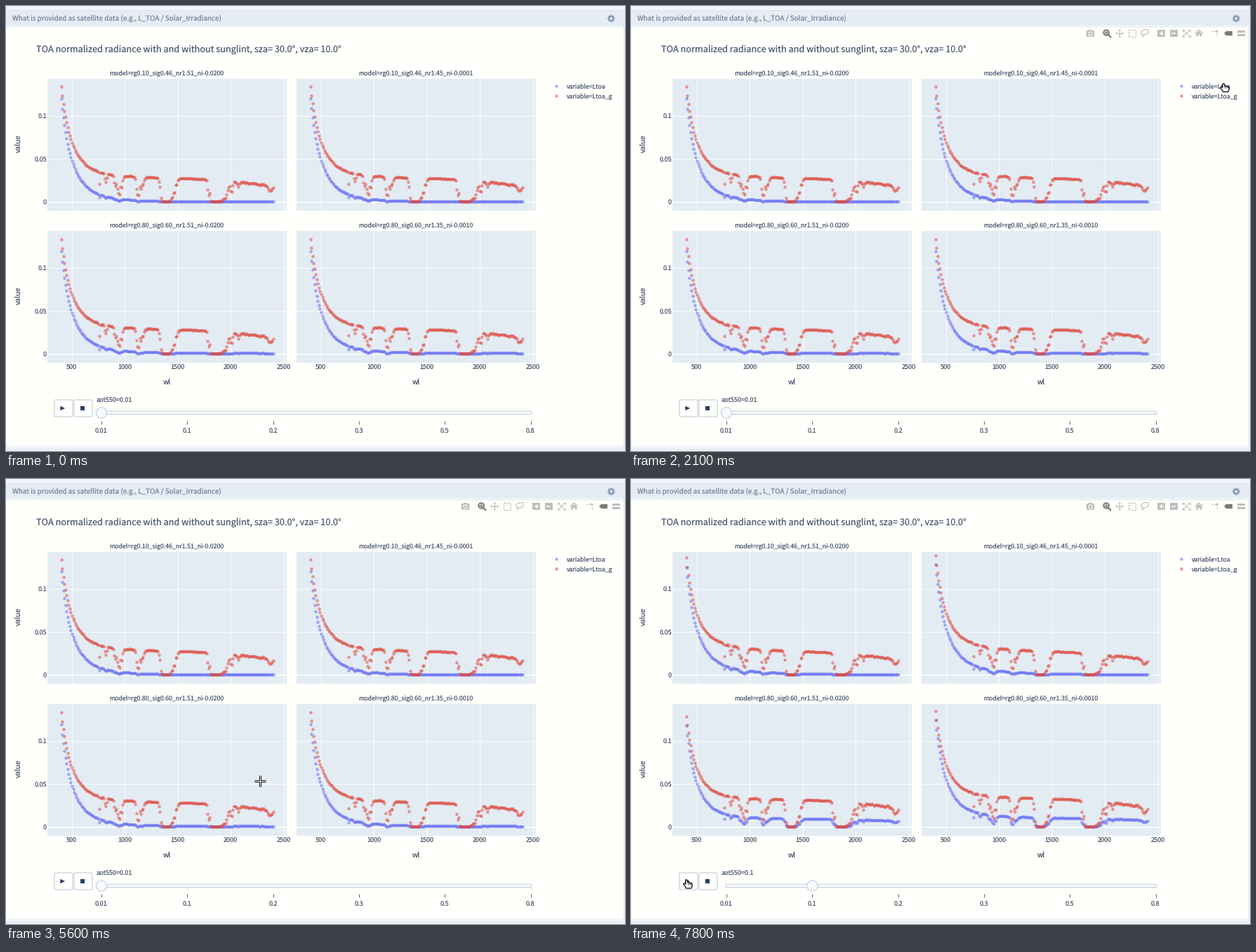
A matplotlib script for the animation above (8000 ms loop, 882 px wide and 635 px high).

```python
import math
import numpy as np
import matplotlib.pyplot as plt
from matplotlib.animation import FuncAnimation
from matplotlib.patches import Circle, FancyBboxPatch, Polygon, Rectangle

W, H, DPI = 882, 635, 128
PT = 72 / DPI
plt.rcParams.update({"font.family": "Noto Sans CJK JP", "text.hinting": "none", "toolbar": "None"})

PAGE, CARD, PANEL = "#f1f5f9", "#fffffb", "#e3ebf3"
INK, SOFT, RED, BLUE = "#2a3f5f", "#4a586f", "#de4b40", "#656df3"
ICON, ACTIVE, EDGE = "#bdbdbc", "#7b7b7a", "#bec8d9"

fig = plt.figure(figsize=(W / DPI, H / DPI), dpi=DPI, facecolor=PAGE)
ax = fig.add_axes([0, 0, 1, 1])
ax.set(xlim=(0, W), ylim=(H, 0))
ax.axis("off")


def rect(x0, y0, x1, y1, fc, ec="none", lw=0.0, z=1, **kw):
    return ax.add_patch(Rectangle((x0, y0), x1 - x0, y1 - y0, fc=fc, ec=ec, lw=lw * PT, zorder=z, **kw))


def pill(x0, y0, x1, y1, r, fc, ec, lw=1.0):
    ax.add_patch(FancyBboxPatch((x0, y0), x1 - x0, y1 - y0, fc=fc, ec=ec, lw=lw * PT, zorder=3,
                                boxstyle=f"round,pad=0,rounding_size={r}"))


def poly(pts, fc, ec="none", lw=0.0, z=4):
    return ax.add_patch(Polygon(pts, fc=fc, ec=ec, lw=lw * PT, zorder=z))


def disc(x, y, r, fc, ec="none", lw=0.0, z=4):
    return ax.add_patch(Circle((x, y), r, fc=fc, ec=ec, lw=lw * PT, zorder=z))


def line(xs, ys, color, lw=1.0, z=2, **kw):
    return ax.plot(xs, ys, color=color, lw=lw * PT, zorder=z, solid_capstyle="butt", **kw)[0]


def text(x, y, s, px, color=SOFT, ha="left", z=5, **kw):
    return ax.text(x, y, s, fontsize=px * PT, color=color, ha=ha, va="baseline", zorder=z, **kw)


# ---------- card ----------
rect(0, 28, 880, 626.5, CARD)
rect(0, 5.5, 880, 28, "#e5ecf4")
for y in (5.5, 28.5, 632):
    line([0, 880], [y, y], "#dae3ec")
line([880, 880], [5, 632], "#dde5ed")
text(9, 21, "What is provided as satellite data (e.g., L_TOA / Solar_Irradiance)", 9.9, "#75869a")
gear = [(862.3 + r * math.cos(a), 17.8 + r * math.sin(a))
        for k in range(8)
        for r, a in ((3.9, k * math.pi / 4 - 0.36), (5.4, k * math.pi / 4 - 0.2),
                     (5.4, k * math.pi / 4 + 0.2), (3.9, k * math.pi / 4 + 0.36))]
poly(gear, "#8b9db3")
disc(862.3, 17.8, 1.8, "#e5ecf4", z=5)
text(43, 66, "TOA normalized radiance with and without sunglint, sza= 30.0°, vza= 10.0°", 12.72)

# ---------- panels ----------
DX, DY = 355, 217
X500, PX_NM, Y0, PX_VAL = 94, 0.1508, 279.5, 1229
NAMES = ["rg0.10_sig0.46_nr1.51_ni-0.0200", "rg0.10_sig0.46_nr1.45_ni-0.0001",
         "rg0.80_sig0.60_nr1.51_ni-0.0200", "rg0.80_sig0.60_nr1.35_ni-0.0010"]
for i, name in enumerate(NAMES):
    ox, oy = DX * (i % 2), DY * (i // 2)
    rect(58.7 + ox, 103.6 + oy, 400.2 + ox, 292 + oy, PANEL)
    for nm in range(500, 2501, 500):
        x = X500 + (nm - 500) * PX_NM + ox
        line([x, x], [103.6 + oy, 292 + oy], "white", 0.9)
        if i > 1:
            text(x, 518, str(nm), 9.1, ha="center")
    for v in (0, 0.05, 0.1):
        y = Y0 - v * PX_VAL + oy
        line([58.7 + ox, 400.2 + ox], [y, y], "white", 0.9 if v else 1.6)
        if i % 2 == 0:
            text(58, y + 3.4, f"{v:g}", 9.1, ha="right")
    text(229.4 + ox, 99 + oy, "model=" + name, 8.8, ha="center")
    if i > 1:
        text(229.6 + ox, 539.8, "wl", 10.3, ha="center")
    if i % 2 == 0:
        text(20.8, 197.5 + oy, "value", 10.2, ha="center", rotation=90, rotation_mode="anchor")

# ---------- spectra ----------
wl = np.arange(400, 2401, 10)
blue_ratio = 400 / wl
rng = np.random.default_rng(4)

# gas absorption bands: centre nm, optical depth, width nm
BANDS = [(760, .42, 6), (820, .4, 11), (905, .35, 11), (945, 1.1, 27), (1120, 1.5, 10), (1150, .55, 32),
         (1385, 8, 34), (1450, 1.2, 32), (1785, .5, 12), (1855, 9, 38), (1925, 2.3, 40),
         (2005, .8, 12), (2065, .4, 12), (2370, .3, 28)]
depth = sum(d * np.exp(-((wl - c) / w) ** 2) for c, d, w in BANDS)
depth *= 1 + 0.22 * rng.standard_normal(len(wl))
noise = np.where(wl > 1950, 0.02, 0.007) * rng.standard_normal(len(wl)) * (wl > 590)
trans = np.exp(-depth) * (1 + noise)

rayleigh = 0.119 * blue_ratio ** 4.13
glint = (0.0278 - 0.0095 * np.clip((wl - 800) / 1600, 0, 1) ** 3.2) * (1 - 0.5 * blue_ratio ** 3.3)

# aerosol per panel: flat part, part that falls with wavelength, its power, glint loss
AEROSOL = [(0, .0062, 1.3, .04), (0, .0088, 1.6, .04), (.0105, -.012, 2, .18), (.0115, -.0065, 2, .18)]


def spectra(p):
    """Pixel positions of both traces while aot550 goes from 0.01 (p=0) to 0.1 (p=1)."""
    low, high = [], []
    for i, (flat, slope, power, loss) in enumerate(AEROSOL):
        haze = (flat + slope * blue_ratio ** power) * (1 - 0.3 * (wl / 2400) ** 3)
        sky = rayleigh + haze * (0.1 + 0.9 * p)
        dim = 1 - p * np.interp(wl, [400, 700], [0.22, loss])
        x = X500 + (wl - 500) * PX_NM + DX * (i % 2)
        y0 = Y0 + DY * (i // 2)
        low.append(np.c_[x, y0 - PX_VAL * sky * trans])
        high.append(np.c_[x, y0 - PX_VAL * (sky + glint * dim) * trans])
    return np.vstack(low), np.vstack(high)


def dots(xy, color, z):
    return ax.scatter(xy[:, 0], xy[:, 1], s=(4.5 * PT) ** 2, c=color, alpha=0.55, lw=0, zorder=z)


start_low, start_high = spectra(0)
low_dots, high_dots = dots(start_low, BLUE, 6), dots(start_high, RED, 7)

# ---------- legend ----------
key_dot = dots(np.array([[783.9, 114.2]]), BLUE, 6)
dots(np.array([[783.9, 128.4]]), RED, 6)
key_text = text(798.3, 117.4, "variable=Ltoa", 8.7)
text(798.3, 131.6, "variable=Ltoa_g", 8.7)

# ---------- buttons and slider ----------
for x in (69, 97):
    pill(x, 562, x + 26, 586, 1.8, "#fffffd", EDGE)
poly([(77.3, 570.8), (77.3, 577.2), (84.2, 574)], INK)
rect(106.2, 571, 112.2, 577, INK, z=4)
pill(134.5, 578.3, 749, 582.5, 1.5, "#fafbfb", EDGE)
GRIP_X, STEP = 136, 122.3
grip = disc(GRIP_X, 580.5, 7.6, "#f8fafb", EDGE, 1)
for k, label in enumerate(["0.01", "0.1", "0.2", "0.3", "0.5", "0.8"]):
    x = GRIP_X + STEP * k
    line([x, x], [592, 597], "#555555", 0.9)
    text(x, 609.2, label, 9.1, ha="center")
load_text = text(128.5, 565.4, "aot550=0.01", 9.0)

# ---------- mode bar ----------
BAR_Y = 39
# camera
pill(648.8, 35.2, 660.2, 43.8, 1, ICON, "none", 0)
rect(652, 33.8, 657, 36, ICON, z=4)
disc(654.5, 39.5, 2.6, ICON, CARD, 1.1)
# zoom
disc(677.2, 38, 3.9, "#c9c9c8", ACTIVE, 1.8)
line([680, 684], [41, 45], ACTIVE, 2.4, 4)
line([675.2, 679.2], [38, 38], ACTIVE, 1.2, 5)
line([677.2, 677.2], [36, 40], ACTIVE, 1.2, 5)
# pan
for dx, dy in ((1, 0), (-1, 0), (0, 1), (0, -1)):
    cx, cy = 696.2 + 3.8 * dx, BAR_Y + 3.8 * dy
    line([696.2, cx], [BAR_Y, cy], ICON, 1.2, 4)
    poly([(cx + 2.2 * dx, cy + 2.2 * dy), (cx + 2.2 * dy, cy + 2.2 * dx), (cx - 2.2 * dy, cy - 2.2 * dx)], ICON)
# box and lasso select
rect(709, 34, 719, 44, "none", ICON, 1.3, z=4, linestyle=(0, (1.8, 1.2)))
a = np.linspace(0, 2 * math.pi, 30)
line(732.2 + 5.2 * np.cos(a), 37.4 + 3.7 * np.sin(a) - 0.8 * np.cos(a), ICON, 1.2, 4)
line([729, 728.2, 730.6], [40.5, 42.6, 44.4], ICON, 1.2, 4)
# zoom in, zoom out
for x in (755.7, 773.4):
    rect(x - 5.3, 33.7, x + 5.3, 44.3, ICON, z=4)
    line([x - 3, x + 3], [BAR_Y, BAR_Y], CARD, 1.5, 5)
line([755.7, 755.7], [36, 42], CARD, 1.5, 5)
# autoscale
for sx in (-1, 1):
    for sy in (-1, 1):
        line([791.4, 791.4 + 4.2 * sx], [BAR_Y, BAR_Y + 4.2 * sy], ICON, 1.0, 4)
        line([791.4 + 2.2 * sx, 791.4 + 5.2 * sx, 791.4 + 5.2 * sx],
             [BAR_Y + 5.2 * sy, BAR_Y + 5.2 * sy, BAR_Y + 2.2 * sy], ICON, 1.1, 4)
# home
line([803.6, 809.3, 815], [39.2, 34.2, 39.2], ICON, 1.3, 4)
poly([(805.3, 39.4), (809.3, 35.9), (813.3, 39.4), (813.3, 43.8), (805.3, 43.8)], ICON)
rect(808, 40.8, 810.6, 43.9, CARD, z=5)
# spikes and hover modes
line([827, 834.8, 834.8], [36, 36, 44], ICON, 1.4, 4, dashes=(1.6, 1.2))
disc(834.8, 36, 1.5, ICON)
poly([(845, 39), (848.2, 35.8), (857, 35.8), (857, 42.2), (848.2, 42.2)], ACTIVE)
for y in (36.4, 41.4):
    rect(863.5, y - 1.8, 874.8, y + 1.8, ICON, z=4)
veil = rect(645, 31, 878, 47, CARD, z=8)

# ---------- hover label ----------
tip = [poly([(434, 115.8), (440, 110.8), (440, 82.3), (621, 82.3), (621, 148.7), (440, 148.7), (440, 120.8)],
            "#e14839", "#4d3f3d", 1, z=10)]
TIP_LINES = ["variable=Ltoa_g", "aot550=0.01", "model=" + NAMES[1], "wl=400", "value=0.1331916"]
for k, s in enumerate(TIP_LINES):
    tip.append(text(443, 93.8 + 12.6 * k, s, 9.65, "#443a3c", z=11, family="Liberation Sans"))

# ---------- pointer ----------
HAND = np.array([(-1.2, 1), (-1.2, 6), (-3.2, 4.8), (-4.6, 5.8), (-2, 9), (-0.8, 12), (6.6, 12), (8, 8.5),
                 (7.8, 5.2), (5.8, 4.2), (1.5, 3.6), (1.5, 1), (0.2, 0)])
ARROW = np.array([(0, 0), (0, 12), (2.8, 9.4), (4.8, 13.6), (6.8, 12.7), (4.9, 8.7), (8.6, 8.5)])
PLUS = np.array([(-8, 0), (8, 0), (np.nan, np.nan), (0, -8), (0, 8)])
hand = poly(HAND, "white", "#111111", 1.3, z=20)
knuckles = [line([0], [0], "#111111", 0.8, 21) for _ in range(3)]
arrow = poly(ARROW, "#111111", "white", 0.9, z=20)
cross = [line([0], [0], "#1c1c1c", 3.2, 20), line([0], [0], "white", 1.0, 21)]

ENTER = (-109, -21)
# moves of the pointer: first frame, last frame, end point
MOVES = [(6, 10, 344, 94), (10, 11, 849, 141), (12, 14, 849, 135), (15, 18, 845, 113), (19, 21, 844.2, 110.5),
         (29, 31, 845.2, 116.5), (47, 51, 733, 214), (52, 59, 84, 594), (59, 61, 79.2, 574), (61, 62, 79.2, 572)]


def pointer_at(n):
    x, y = ENTER
    for first, last, ex, ey in MOVES:
        t = min(max((n - first) / (last - first), 0), 1)
        x, y = x + (ex - x) * t, y + (ey - y) * t
    return x, y


def place_pointer(n):
    x, y = pointer_at(n)
    on_legend = x > 800 and 100 < y < 122
    on_button = x < 96 and 562 < y < 586
    on_hand = on_legend or on_button
    on_plot = 80 < y < 508 and not on_hand
    hand.set_visible(on_hand)
    arrow.set_visible(n > 6 and not on_hand and not on_plot)
    hand.set_xy(HAND + (x, y))
    arrow.set_xy(ARROW + (x, y))
    for j, k in enumerate(knuckles):
        k.set_visible(on_hand)
        k.set_data([x + 1.4 + 2.1 * j] * 2, [y + 3.8, y + 6.5])
    for c in cross:
        c.set_visible(on_plot)
        c.set_data(PLUS[:, 0] + x, PLUS[:, 1] + y)


def ease(t):
    t = min(max(t, 0), 1)
    return 4 * t ** 3 if t < 0.5 else 1 - 4 * (1 - t) ** 3


def update(n):
    veil.set_alpha(1 - np.interp(n, [7, 10, 11, 12, 14], [0, 1, .5, .5, 1]))
    for part in tip:
        part.set_visible(n == 10)
    hidden = 32 <= n < 46
    low_dots.set_visible(not hidden)
    key_dot.set_alpha(0.28 if hidden else 0.55)
    key_text.set_alpha(0.5 if hidden else 1)
    p = ease((n - 74) / 4)
    low, high = spectra(p)
    low_dots.set_offsets(low)
    high_dots.set_offsets(high)
    grip.center = (GRIP_X + STEP * p, 580.5)
    load_text.set_text("aot550=0.1" if n >= 75 else "aot550=0.01")
    place_pointer(n)
    return []


anim = FuncAnimation(fig, update, frames=80, interval=100, repeat=True, repeat_delay=0, blit=False)
plt.show()
```
